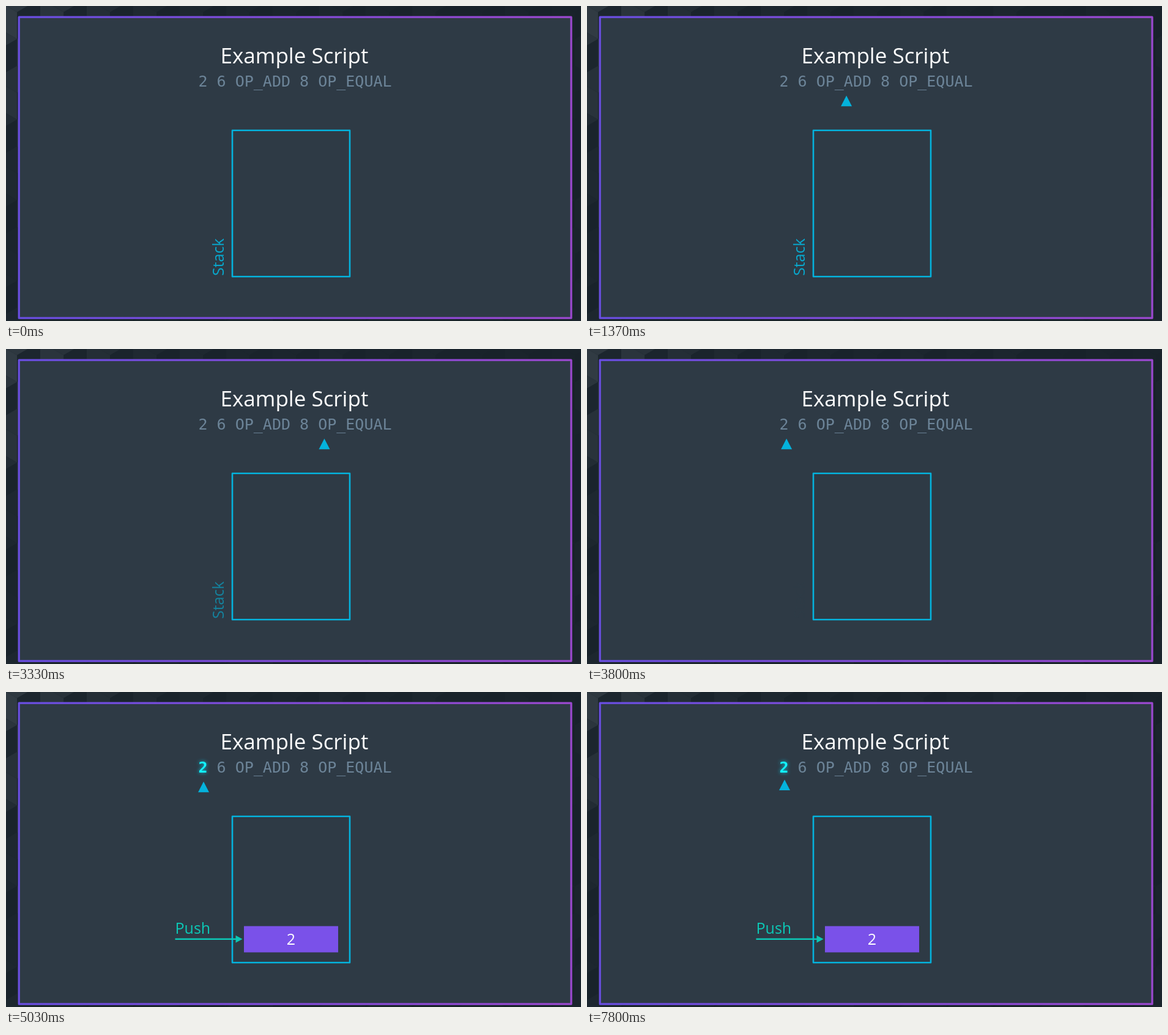
An HTML page with a canvas that plays this animation: 940x516 px, repeating every 8 s.

```html
<!DOCTYPE html>
<html lang="en">
<head>
<meta charset="utf-8">
<title>Script stack</title>
<style>
html, body { margin: 0; width: 100%; height: 100%; overflow: hidden; background: #1a242c; }
canvas { display: block; }
</style>
</head>
<body>
<canvas id="stage" width="940" height="516"></canvas>
<script>
const ctx = document.getElementById('stage').getContext('2d');
const LOOP = 8000;
const SANS = '"Open Sans", "Noto Sans", sans-serif';
const MONO = '"DejaVu Sans Mono", monospace';
const CYAN = '#04b2dc';
const TEAL = '#0cc8b6';

const clamp = v => Math.min(1, Math.max(0, v));
const lerp = (a, b, p) => a + (b - a) * p;
const sigmoid = x => 1 / (1 + Math.exp(-x));

// Normalised logistic ease from start over len milliseconds.
function ease(t, start, len = 1000) {
  const low = sigmoid(-5);
  return clamp((sigmoid(10 * (clamp((t - start) / len) - 0.5)) - low) / (1 - 2 * low));
}

function poly(color, points) {
  ctx.fillStyle = color;
  ctx.beginPath();
  for (const [x, y] of points) ctx.lineTo(x, y);
  ctx.closePath();
  ctx.fill();
}

function label(str, x, y, font, color, align = 'left') {
  ctx.font = font;
  ctx.fillStyle = color;
  ctx.textAlign = align;
  ctx.fillText(str, x, y);
}

function layer(alpha, draw) {
  if (alpha <= 0) return;
  ctx.save();
  ctx.globalAlpha = alpha;
  draw();
  ctx.restore();
}

// Isometric cube whose top face is centred on x, y; light falls from the top left.
function cube(x, y) {
  const w = 38, h = 22;
  const light = Math.exp(-Math.hypot(x, y) / 170);
  const noise = Math.abs(Math.sin(x * 12.99 + y * 78.23) * 437.5) % 1;
  const shade = face => {
    const v = 24 * face * light + 4 * face * noise;
    return `rgb(${24 + v}, ${34 + v}, ${42 + v})`;
  };
  poly(shade(0.2), [[x, y + h], [x + w, y], [x + w, y + 2 * h], [x, y + 3 * h]]);
  poly(shade(1.1), [[x, y + h], [x - w, y], [x - w, y + 2 * h], [x, y + 3 * h]]);
  poly(shade(1), [[x - w, y], [x, y - h], [x + w, y], [x, y + h]]);
}

function backdrop() {
  ctx.fillStyle = '#1a242c';
  ctx.fillRect(0, 0, 940, 516);
  for (let row = 0; row < 9; row++) {
    for (let col = 0; col < 14; col++) cube(18 + 76 * col - 38 * (row % 2), 66 * row - 12);
  }
}

function panel() {
  ctx.fillStyle = '#2e3a45';
  ctx.fillRect(21, 18, 903, 493);
  const edge = ctx.createLinearGradient(21, 0, 924, 0);
  edge.addColorStop(0, '#6a4ee2');
  edge.addColorStop(1, '#9c48d0');
  ctx.strokeStyle = edge;
  ctx.lineWidth = 3.2;
  ctx.strokeRect(21.2, 18.2, 902.8, 493);
}

function stackBox(t) {
  ctx.strokeStyle = CYAN;
  ctx.lineWidth = 2.6;
  ctx.lineJoin = 'round';
  ctx.strokeRect(370, 203.7, 192, 239.6);
  layer(1 - ease(t, 2895), () => {
    ctx.translate(356, 442);
    ctx.rotate(-Math.PI / 2);
    label('Stack', 0, 0, '25px ' + SANS, '#08a8cd');
  });
}

function script(t) {
  const x = 314.5, y = 132, glow = clamp((t - 3870) / 620);
  label('Example Script', 471.4, 94, '35px ' + SANS, '#fff', 'center');
  layer(1 - glow, () => label('2', x, y, '25px ' + MONO, '#6c8498'));
  label('  6 OP_ADD 8 OP_EQUAL', x, y, '25px ' + MONO, '#6c8498');
  layer(glow, () => {
    ctx.shadowColor = '#08c8e0';
    ctx.shadowBlur = 6;
    label('2', x, y, 'bold 25px ' + MONO, '#12f4ff');
  });
}

function pointer(t) {
  const away = ease(t, 938) - ease(t, 2895);
  const x = lerp(323, 623.6, away);
  const y = 146.8 - 3.2 * ease(t, 4870, 3000);
  layer(ease(t, 240, 520), () => poly(CYAN, [[x, y], [x + 9, y + 17.4], [x - 9, y + 17.4]]));
}

function arrow(p) {
  if (p <= 0) return;
  ctx.strokeStyle = TEAL;
  ctx.lineWidth = 2.4;
  ctx.beginPath();
  ctx.moveTo(276.5, 404.7);
  ctx.lineTo(lerp(276.5, 377, p), 404.7);
  ctx.stroke();

  // head outline traced side by side, filled as it grows
  const head = [[375.5, 410.7], [386.5, 404.7], [375.5, 398.7], [375.5, 410.7]];
  const side = Math.min(2, Math.floor(p * 3));
  const a = head[side], b = head[side + 1], part = p * 3 - side;
  const end = [lerp(a[0], b[0], part), lerp(a[1], b[1], part)];
  poly(TEAL, [...head.slice(0, side + 1), end]);
}

function push(t) {
  const p = ease(t, 3870);
  arrow(p);
  layer(p, () => {
    const word = 'Push'.slice(0, Math.floor(p * 4 + 0.02));
    label(word, 276.5, 395.5, '25px ' + SANS, TEAL);
  });
  if (p <= 0) return;
  ctx.save();
  ctx.translate(466, 405);
  ctx.scale(p, p);
  ctx.fillStyle = '#7a51e9';
  ctx.fillRect(-77, -21.5, 154, 43);
  label('2', 0, 8.7, '25px ' + SANS, '#fff', 'center');
  ctx.restore();
}

function frame() {
  const t = performance.now() % LOOP;
  backdrop();
  panel();
  script(t);
  stackBox(t);
  pointer(t);
  push(t);
  requestAnimationFrame(frame);
}
frame();
</script>
</body>
</html>
```
